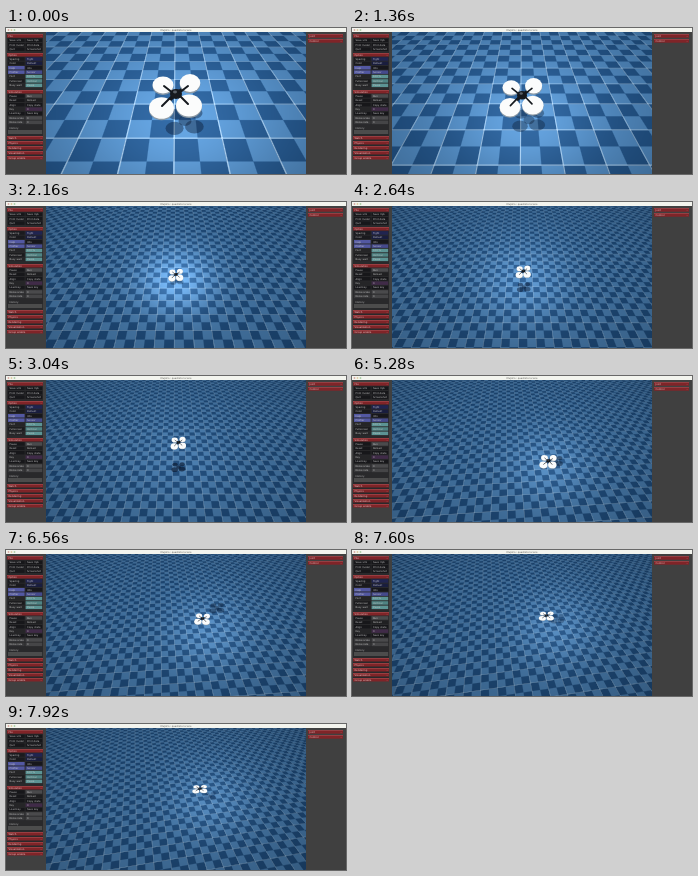
Write an HTML page with a canvas that moves like this. It is 340 px wide and 146 px high and loops after 8000 ms.

```html
<!DOCTYPE html>
<html lang="en">
<head>
<meta charset="utf-8">
<style>
html, body { margin: 0; width: 100%; height: 100%; overflow: hidden; background: #404040; }
canvas { display: block; width: 340px; height: 146px; }
</style>
</head>
<body>
<canvas id="stage" width="340" height="146"></canvas>
<script>
const ctx = document.getElementById('stage').getContext('2d');
const LOOP = 8000, X0 = 40, Y0 = 4, W = 260, H = 142, FOCAL = 171;

// Each track: rows of [time, ...values]
const camera = [ // distance in cells, azimuth in degrees, look-at x, y
  [0, 8.6, 0, .1, .1], [320, 8.6, 0, .1, .1], [1360, 10.8, 0, .1, .1],
  [1700, 17, 0, .1, .1], [2160, 24, 0, .2, .1], [2880, 28.5, 0, .5, .1],
  [3760, 28, 0, .5, .1], [4640, 28, 4, .5, .1], [6560, 28, 4, .5, .1], [7920, 28, 10, .5, .1]
];
const drone = [ // x, y, scale x, scale y, skew
  [0, 170, 68, 1, 1, 0], [320, 170, 68, 1, 1, 0], [1360, 170, 69, .83, .86, 0],
  [1700, 170, 71, .5, .5, 0], [2160, 170, 73, .28, .28, 0], [3040, 172.5, 67, .29, .28, 0],
  [3840, 174, 85, .32, .33, 0], [4700, 188, 92, .34, .33, .05],
  [5600, 201, 82, .31, .3, .1], [6560, 196.5, 69, .29, .26, .12], [7920, 194, 65, .28, .19, .02]
];
const shade = [ // x, y, size, opacity
  [0, 179, 93, .72, .42], [320, 179, 93, .72, .42], [1360, 177, 92, .62, .38],
  [2160, 171, 78, .25, .3], [3040, 172.5, 91, .26, .65], [3840, 173, 103, .28, .55],
  [4700, 190, 104, .28, .5], [5600, 211, 75, .28, .45], [6560, 211, 58, .28, .4], [7920, 204, 72, .24, .22]
];
const glow = [ // x, y, radius, strength, ambient
  [0, 174, 94, 130, .28, 1.04], [320, 174, 94, 130, .28, 1.04], [1360, 174, 94, 105, .3, 1],
  [2160, 170, 78, 55, .62, .88], [3040, 172, 80, 75, .14, .86], [3840, 173, 97, 62, .28, .87],
  [5600, 201, 88, 62, .28, .86], [6560, 203, 81, 60, .3, .86], [7920, 204, 76, 62, .26, .84]
];

function sample(track, t) {
  let i = 1;
  while (i < track.length - 1 && t > track[i][0]) i++;
  const a = track[i - 1], b = track[i];
  const k = Math.min(1, Math.max(0, (t - a[0]) / (b[0] - a[0])));
  return a.slice(1).map((v, j) => v + (b[j + 1] - v) * k);
}

// Mean of a +1/-1 square wave (period 2) over a window
const ramp = x => { const m = x - 2 * Math.floor(x / 2); return m < 1 ? m : 2 - m; };
const square = (x, w) => (ramp(x + w / 2) - ramp(x - w / 2)) / w;
// Mean coverage of thin seams at every second cell
const SEAM = .05;
const seamSum = x => { const n = Math.floor(x / 2); return n * SEAM + Math.min(x - 2 * n, SEAM); };
const seam = (x, w) => (seamSum(x + w / 2) - seamSum(x - w / 2)) / w;

const floor = document.createElement('canvas');
floor.width = W;
floor.height = H;
const fctx = floor.getContext('2d');
const image = fctx.createImageData(W, H);
const DARK = [32, 79, 129], LIGHT = [75, 129, 181], EDGE = [176, 204, 228];

function drawFloor(t) {
  const [dist, az, lx, ly] = sample(camera, t);
  const [gx, gy, gr, gs, amb] = sample(glow, t);
  const c = Math.cos(az * Math.PI / 180), s = Math.sin(az * Math.PI / 180);
  const px = image.data;
  let p = 0;
  for (let j = 0; j < H; j++) {
    const y = j + Y0 + .5, v = (y - 75) / FOCAL;
    const depth = dist / (1 + v);
    const fwd = dist * ((1 - v) / (1 + v) - 1) * Math.SQRT1_2;
    const stepX = depth / FOCAL, stepF = Math.SQRT2 * dist / (1 + v) ** 2 / FOCAL;
    for (let i = 0; i < W; i++) {
      const x = i + X0 + .5, u = (x - 170) / FOCAL;
      const side = depth * u, shear = stepX * u / (1 + v);
      const fx = c * side + s * fwd + lx, fy = c * fwd - s * side + ly;
      const wx = Math.hypot(c * stepX, s * stepF - c * shear) * 1.15;
      const wy = Math.hypot(s * stepX, c * stepF + s * shear) * 1.15;
      const mix = .5 + .5 * square(fx, wx) * square(fy, wy);
      const line = Math.min(1, seam(fx, wx) + seam(fy, wy)) * .8;
      const r = Math.hypot(x - gx, (y - gy) * 1.2) / gr;
      const hot = gs * Math.exp(-r * r * 2);
      const far = Math.hypot((x - 170) / 170, (y - 75) / 110);
      const lit = amb * (1 - .16 * far * far) + hot * .55;
      for (let k = 0; k < 3; k++) {
        const base = DARK[k] + (LIGHT[k] - DARK[k]) * mix;
        px[p++] = (base + (EDGE[k] - base) * line) * lit + hot * 48;
      }
      px[p++] = 255;
    }
  }
  fctx.putImageData(image, 0, 0);
  ctx.drawImage(floor, X0, Y0);
}

const rotors = [[-13, -11, 10.5, 8.5], [14, -13, 10.3, 9], [-14.5, 12, 12.5, 10.8], [13, 9.5, 13, 11]];

function disc(x, y, rx, ry, color) {
  ctx.fillStyle = color;
  ctx.beginPath();
  ctx.ellipse(x, y, rx, ry, 0, 0, 7);
  ctx.fill();
}

function drawShade(t) {
  const [x, y, size, alpha] = sample(shade, t);
  ctx.save();
  ctx.translate(x, y);
  ctx.scale(size, size * .85);
  const ink = `rgba(10,25,48,${alpha})`;
  rotors.forEach(([a, b, rx, ry]) => disc(a, b, rx, ry, ink));
  disc(0, 0, 9, 8, ink);
  ctx.restore();
}

function drawDrone(t) {
  const [x, y, sx, sy, skew] = sample(drone, t);
  ctx.save();
  ctx.translate(x, y);
  ctx.transform(sx, skew * sx, -skew * sy, sy, 0, 0);
  ctx.lineCap = 'round';
  ctx.strokeStyle = '#15191e';
  ctx.lineWidth = 3.2;
  ctx.beginPath();
  rotors.forEach(([a, b]) => { ctx.moveTo(0, -2); ctx.lineTo(a, b); });
  ctx.stroke();
  rotors.forEach(([a, b, rx, ry]) => {
    disc(a, b + 1.4, rx, ry, '#8d9aa5');
    disc(a, b, rx, ry, '#fbfcfc');
  });
  disc(0, -2, 6, 5, '#171a1e');
  ctx.lineWidth = 2;
  ctx.beginPath();
  ctx.moveTo(-12, -10); ctx.lineTo(-3, -3);
  ctx.moveTo(12, -10); ctx.lineTo(3, -3);
  ctx.moveTo(-14, 10); ctx.lineTo(-5, 1);
  ctx.moveTo(12, 8); ctx.lineTo(4, 0);
  ctx.stroke();
  disc(-1, -4, 2, 1.4, '#5a6168');
  ctx.restore();
}

function box(x, y, w, h, color) {
  ctx.fillStyle = color;
  ctx.fillRect(x, y, w, h);
}

function label(text, x, y, color = '#c4c4c4', size = 2.5, align = 'left') {
  ctx.font = `${size}px "DejaVu Sans", sans-serif`;
  ctx.textAlign = align;
  ctx.textBaseline = 'middle';
  ctx.fillStyle = color;
  ctx.fillText(text, x, y);
}

function header(text, x, y, w) {
  box(x, y, w, 3.5, '#802428');
  box(x, y, w, .7, '#a34a4c');
  label(text, x + 1.5, y + 1.9, '#e0c8c8');
  label('–', x + w - 2.5, y + 1.9, '#e0c8c8');
}

function pair(y, a, b, left = '#17171a', right = left) {
  box(2, y, 16.6, 3.5, left);
  box(19.6, y, 16.6, 3.5, right);
  label(a, 3.5, y + 1.9);
  label(b, 21, y + 1.9);
}

function drawPanels() {
  box(0, 0, 340, 4, '#f3f4ee');
  ['#d8a9a2', '#dccba0', '#acd0a7'].forEach((color, i) => disc(2.5 + 3 * i, 2, .9, .9, color));
  label('MuJoCo : quadrotor scene', 170, 2.1, '#55554f', 2.4, 'center');

  box(0, 4, 40, 142, '#404040');
  box(1, 6, 36, 125, '#29292b');
  header('File', 1, 6.2, 36);
  pair(10.6, 'Save xml', 'Save mjb');
  pair(15, 'Print model', 'Print data');
  pair(19.4, 'Quit', 'Screenshot');
  header('Option', 1, 25, 36);
  pair(29.2, 'Spacing', 'Tight', '#1a1a1e', '#202450');
  pair(33.6, 'Color', 'Default', '#1a1a1e', '#191d3e');
  pair(38, 'Help', 'Info', '#5358a2', '#17171c');
  pair(42.4, 'Profiler', 'Sensor', '#5358a2', '#454a8c');
  pair(46.8, 'Font', '100 %', '#252527', '#5c9494');
  pair(51.2, 'Fullscreen', 'Vertical', '#1b1b1d', '#4f8484');
  pair(55.6, 'Busy wait', 'Pause', '#252527', '#5c9494');
  header('Simulation', 1, 62, 36);
  pair(66.2, 'Pause', 'Run', '#17171a', '#4a4a4c');
  pair(70.6, 'Reset', 'Reload', '#17171a', '#202022');
  pair(75, 'Align', 'Copy state');
  pair(79.4, 'Key', '0', '#252527', '#402b48');
  pair(83.8, 'Load key', 'Save key');
  pair(88.2, 'Noise scale', '0', '#373739', '#4a4a4c');
  pair(92.6, 'Noise rate', '0', '#373739', '#454547');
  label('History', 3.5, 100, '#bbb');
  box(2, 102, 34.2, 4, '#4c4c4c');
  ['Watch', 'Physics', 'Rendering', 'Visualization', 'Group enable']
    .forEach((name, i) => header(name, 1, 108 + 5 * i, 36));

  box(300, 4, 40, 142, '#404040');
  header('Joint', 302, 6.2, 35);
  header('Control', 302, 11.2, 35);
}

function frame(now) {
  const t = now % LOOP;
  drawFloor(t);
  drawShade(t);
  drawDrone(t);
  drawPanels();
  requestAnimationFrame(frame);
}
requestAnimationFrame(frame);
</script>
</body>
</html>
```
